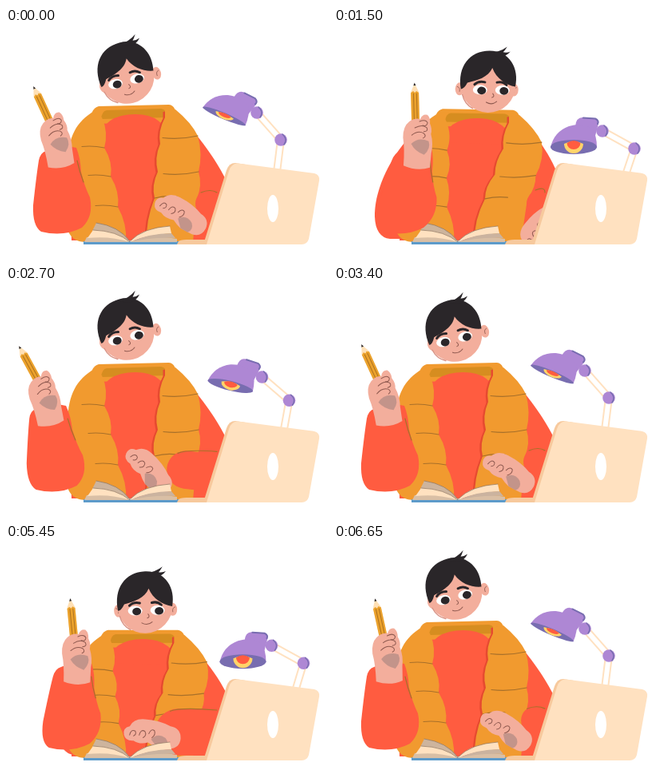
Recreate the animation shown at these times as an HTML page. Size 403 by 288 pixels, loop 6.7 s.

```html
<!DOCTYPE html>
<html lang="en">
<head>
<meta charset="utf-8">
<title>Studying at the desk</title>
<style>
html, body { margin: 0; width: 100%; height: 100%; overflow: hidden; background: #fff; }
svg { display: block; width: 100vw; height: 100vh; }
</style>
</head>
<body>
<svg id="stage" viewBox="0 0 403 288">
  <clipPath id="desk"><rect width="403" height="268"/></clipPath>
</svg>
<script>
const LOOP = 6700, SECOND = 3450, STEP = 50, WAG = 425;
const RED = '#ff5c40', ORANGE = '#f19a2f', DARK = '#d68d20', CREASE = '#a8702a', SKIN = '#f3ae9c',
  SHADE = '#c3948a', LINE = '#8f5a50', HAIR = '#2a2629', CREAM = '#ffe1c0', LILAC = '#ae87d4', VIOLET = '#786db0';
const stage = document.getElementById('stage');

function set(node, attrs) {
  for (const key in attrs) node.setAttribute(key, attrs[key]);
}
function add(parent, tag, attrs) {
  const node = document.createElementNS('http://www.w3.org/2000/svg', tag);
  set(node, attrs || {});
  return parent.appendChild(node);
}
const group = parent => add(parent, 'g');
const fill = (parent, d, color) => add(parent, 'path', { d, fill: color });
const line = (parent, d, color, width) => add(parent, 'path', {
  d, fill: 'none', stroke: color, 'stroke-width': width, 'stroke-linecap': 'round', 'stroke-linejoin': 'round' });
const oval = (parent, cx, cy, rx, ry, color) => add(parent, 'ellipse', { cx, cy, rx, ry, fill: color });
const place = (node, x, y, turn = 0, tall = 1) =>
  node.setAttribute('transform', `translate(${x} ${y}) rotate(${turn}) scale(1 ${tall})`);

// Timing curves
const clamp = s => Math.min(1, Math.max(0, s));
const smooth = s => clamp(s) ** 2 * (3 - 2 * clamp(s));
const ease = (u, from, to) => smooth((u - from) / (to - from));
const pulse = (u, rise, top, fall, end) => ease(u, rise, top) - ease(u, fall, end);
const bump = (u, from, to) => Math.sin(Math.PI * clamp((u - from) / (to - from)));

// Moves every x y pair of a path.
const remap = (d, move) => d.replace(/(-?[\d.]+) (-?[\d.]+)/g, (_, x, y) =>
  move(+x, +y).map(v => v.toFixed(1)).join(' '));
const soft = [];
function flexible(node, move) {
  const d = node.getAttribute('d');
  soft.push(p => node.setAttribute('d', remap(d, (x, y) => move(x, y, p))));
  return node;
}
// The torso bends above the waist, the collar most of all.
const bend = (x, y, { lean, nod }) => {
  const k = smooth((240 - y) / 110);
  return [x + 20 * lean * k, y + k * (lean * (3 + (x - 110) * .04) + 8 * nod)];
};
// The sleeve follows the wrist, the elbow less so.
const follow = (x, y, { penX }) => [x + penX * (1 - .5 * clamp((y - 150) / 100)), y];

// Scalloped quilt edge through the given points.
const puffs = (points, bulge) => points.slice(1).map(([x, y], i) =>
  `Q${(x + points[i][0]) / 2 + bulge} ${(y + points[i][1]) / 2} ${x} ${y}`).join(' ');
// Seams start at an edge point and run sideways.
const seams = (points, length, sag) => points.map(([x, y]) =>
  `M${x} ${y} Q${x + length / 2} ${y + sag} ${x + length} ${y + sag / 2}`).join(' ');

// Lamp
const lamp = group(stage);
const rods = [CREAM, '#fff'].map((color, i) => line(lamp, '', color, i ? 6 : 10));
const shade = group(lamp);
fill(shade, 'M-34 -6 Q-33 -17 -25 -17 L-9 -16 Q-3 -13 -5 -9 L-9 6Z', LILAC);
line(shade, 'M-24 -16.5 L-9 -15.5 Q-4 -13 -6 -9', VIOLET, 2);
fill(shade, 'M-65 21 Q-61 1 -42 -6 Q-24 -11 -13 -3 Q-7 5 -7 21Z', LILAC);
const mouth = oval(shade, -36, 20, 29, 9, VIOLET);
const glow = fill(shade, 'M-48 16 A12 12 0 0 0 -24 16 Q-36 10 -48 16Z', '#ffd469');
const bulb = fill(shade, 'M-44.500 15 A8.5 8 0 0 0 -27.500 15 Q-36 9 -44.500 15Z', RED);
const knobs = [0, 1].map(() => {
  const g = group(lamp);
  oval(g, 0, 0, 7.8, 7.8, LILAC);
  line(g, 'M2 -7 Q9 -1 4 6', VIOLET, 1.5);
  return g;
});

// Torso and vest
const body = group(stage);
const backArm = fill(body, 'M132 108 C90 126 50 190 51 236 Q52 262 70 264 L130 264Z', RED);
const cloth = (d, color) => flexible(fill(body, d, color), bend);
const stitch = d => flexible(line(body, d, CREASE, 1.2), bend);
const leftEdge = [[150, 268], [140, 224], [131, 186], [123, 150], [120, 112]];
const rightEdge = [[176, 268], [186, 213], [190, 180], [193, 145], [199, 112]];
const outerEdge = [[212, 102], [240, 135], [241, 180], [239, 213]];
cloth('M110 108 C90 118 80 145 80 200 L82 266 L270 266 L280 200 C262 160 232 124 212 106Z', RED);
cloth('M106 120 Q105 101 116 98 L204 96 Q214 97 214 118Z', ORANGE);
cloth('M119 114 Q120 104 126 103 L194 101 Q201 102 202 112Z', DARK);
cloth('M116 140 Q122 108 162 108 Q198 108 204 140Z', RED);
cloth(`M110 104 C88 118 78 135 77 170 L78 255 Q84 268 100 268 L150 268 ${puffs(leftEdge, 7)}Z`, ORANGE);
stitch(seams(leftEdge.slice(1, 4), -28, -3));
const panel = `M199 104 L212 102 ${puffs(outerEdge, 6)} L234 268 L176 268 ${puffs(rightEdge, -6)}Z`;
cloth(panel, '#e64a30').setAttribute('transform', 'translate(-2.5 1)');
cloth(panel, ORANGE);
stitch(seams(outerEdge.slice(1, 3), -44, 5) + seams(rightEdge.slice(1, 2), 28, -4));

// Right sleeve and hand
const sleeve = line(stage, '', RED, 34);
const sleeveFold = line(stage, '', CREASE, 1.2);
const palm = group(add(stage, 'g', { 'clip-path': 'url(#desk)' }));
fill(palm, 'M-34 2 Q-36 -7 -27 -9 Q-22 -19 -8 -18 Q10 -17 24 -10 Q37 -8 37 5 Q36 17 24 18 L8 17 Q2 15 -4 11 Q-14 14 -22 9 Q-32 10 -34 2Z', SKIN);
fill(palm, 'M0 7 Q8 -2 18 5 Q24 12 18 18 L8 17Z', SHADE);
line(palm, 'M-27 2 q2 -8 7 -5 q2 4 -2 6 M-15 2 q2 -8 7 -5 q3 5 -2 8 M-3 0 q3 -7 7 -4 q2 5 -3 9', LINE, 1);

// Laptop
fill(stage, 'M214 268 Q218 265 226 265 L262 265 L262 271 L214 271Z', '#f7c99d');
fill(stage, 'M247 271 L276 178 Q279 169 287 169 L300 171 L270 271Z', '#f7c99d');
fill(stage, 'M251 271 L279 179 Q282 169 291 169.5 L386 182 Q393 184 392 191 L379 264 Q377 271 370 271Z', CREAM);
oval(stage, 334, 226, 7, 17, '#fff');

// Book
fill(stage, 'M97 267 L216 267 L214 271 L97 271Z', '#5d9bca');
fill(stage, 'M101 262 Q130 258 155 268 Q182 258 214 264 L214 268 L98 268Z', '#d9bfa5');
fill(stage, 'M113 244 Q141 248 155 267 Q132 254 108 254Z', '#cdb49d');
fill(stage, 'M102 263 L109 253 Q139 254 155 268 Q130 260 102 263Z', CREAM);
fill(stage, 'M155 268 Q168 251 205 248 L207 257 Q176 259 155 268Z', CREAM);
fill(stage, 'M155 268 Q180 257 207 257 L212 263 Q180 262 155 268Z', '#cbb39f');
line(stage, 'M113 244 Q141 248 155 267 Q172 250 205 248 M109 253 Q139 254 155 268', '#8c7561', .7);

// Left arm, hand and pencil
flexible(fill(stage, 'M50 154 Q70 145 88 150 Q93 162 94 180 Q98 198 105 212 Q110 236 95 250 Q72 262 44 255 Q33 248 34 222 Q38 185 41 166 Q43 156 50 154Z', RED), follow);
flexible(line(stage, 'M89 166 Q92 180 97 193', CREASE, 1.2), follow);
const fist = group(stage);
const pencil = group(fist);
fill(pencil, 'M-5 8 L-5 -35 L0 -46 L5 -35 L5 8Z', '#ffe0b5');
fill(pencil, 'M-5 8 L-5 -34 L-2 -36 L0 -34 L2 -36 L5 -34 L5 8Z', '#eba22d');
line(pencil, 'M-1.7 -33 L-1.7 6 M2.2 -33 L2.2 6', '#ad701d', 1);
fill(pencil, 'M-1.5 -43 L0 -46.5 L1.5 -43Z', HAIR);
fill(fist, 'M-17 -3 Q-15 -24 -17 -38 Q-17 -52 -9 -58 Q-2 -63 5 -61 Q8 -68 14 -66 Q18 -62 17 -55 Q20 -48 18 -42 Q21 -30 18 -18 L16 0 Q0 5 -17 -3Z', SKIN);
fill(fist, 'M-7 -30 Q2 -39 15 -33 Q18 -24 9 -16 Q-2 -20 -7 -30Z', SHADE);
line(fist, 'M4 -58 q8 -3 10 2 q-1 5 -6 3 M-2 -50 q9 -5 15 0 q2 5 -4 5 M-6 -41 q8 -6 15 -2 q4 4 -1 6', LINE, 1);

// Head
const head = group(stage);
const ears = group(head);
[-1, 1].forEach(side => {
  oval(ears, side * 34, 10, 5.5, 8, SKIN);
  line(ears, `M${side * 37} 7 q${-side * 4} 1 ${-side * 3} 6`, LINE, .8);
});
oval(head, 0, 4, 34.5, 35, SKIN);
line(head, 'M-32 17 Q-29 29 -19 34', '#d99385', 1.5);
fill(head, 'M-34 10 C-39 -18 -24 -38 1 -38.5 C26 -39 39 -17 34 6 C22 4 10 -4 5 -17 C0 -5 -14 -1 -26 2 Q-30 10 -34 10Z', HAIR);
fill(head, 'M0 -36 Q14 -37 23 -44 Q20 -39 18 -37 Q23 -36 27 -38 Q22 -31 12 -31Z', HAIR);
const face = group(head);
line(face, 'M-19 4 Q-14 -1 -6 1 M9 1 Q16 -1 21 4', HAIR, 3);
const eyes = group(face);
[-12, 16].forEach(x => oval(eyes, x, 0, 9, 6, '#fff'));
const pupils = group(eyes);
[-12, 16].forEach(x => oval(pupils, x, 0, 5.5, 4.8, HAIR));
line(face, 'M4 15 Q7 19 3 20', LINE, 1);
line(face, 'M-4 26 Q3 30 9 25', LINE, 1.1);

function drawLamp(lift, drift) {
  const x1 = 314 + 16 * lift + drift, y1 = 106 + 20 * lift + drift / 2;
  const x2 = 344 + 26 * lift + drift, y2 = 140 + 8 * lift + drift / 2;
  const foot = 338 + (x2 - 344) * .8;
  rods.forEach(rod => rod.setAttribute('d', `M${x1} ${y1} L${x2} ${y2} L${foot} 188`));
  place(shade, x1, y1, 23 * (1 - lift));
  place(knobs[0], x1, y1);
  place(knobs[1], x2, y2);
  const open = .45 + .55 * lift;
  mouth.setAttribute('ry', 9 * open);
  [glow, bulb].forEach(node => place(node, 0, 20 * (1 - open), 0, open));
}

function drawHead({ lean, nod, hop, drift, blink }) {
  place(head, 150 + 40 * lean + drift / 2, 56 + 8 * lean + 11 * nod + drift / 2 - hop, -14 + 15 * lean + 4 * nod);
  const turn = -4 + 6 * lean;
  place(ears, -turn * .8, 0);
  place(face, turn, 0);
  place(eyes, 0, 10.5, 0, 1 - .45 * blink);
  place(pupils, 2, 1);
}

function drawArms({ lean, read, penX, tilt }) {
  place(fist, 70 + penX, 173 + 2 * lean, tilt * .6);
  place(pencil, -1, -60, tilt * .4);

  const x = 218 + 40 * lean - 59 * read, y = 232 + 17 * lean - 4 * read;
  place(palm, x, y, 24 - 79 * lean + 22 * read);
  const width = 34 + 8 * lean + 20 * read;
  const ex = x + 36 - 32 * lean + 16 * read, ey = y - 12 - 16 * lean + 19 * read;
  const top = ey - width / 2;
  set(sleeve, { d: `M${ex} ${ey} L292 ${238 - 4 * lean}`, 'stroke-width': width });
  sleeveFold.setAttribute('d', `M${ex - 10} ${top + 3} Q${ex + 2} ${top - 2} 264 ${206 + 2 * read}`);
}

function draw(u) {
  const lean = pulse(u, 250, 750, 1750, 2300);
  const pose = {
    lean,
    read: pulse(u, 1500, 2000, 2300, 3350),
    nod: pulse(u, 1500, 2000, 2100, 2700),
    hop: 4 * bump(u, 2600, 3200),
    drift: 6 * bump(u, 700, 2200),
    blink: bump(u, 950, 1250),
    penX: 34 * lean - 20 * bump(u, 2000, 2900),
    tilt: -19 + 8 * Math.sin((u / WAG + .625) * 2 * Math.PI) + 11 * bump(u, 400, 2400) - 12 * bump(u, 2100, 2900)
  };
  soft.forEach(update => update(pose));
  place(backArm, 35 * (1 - lean), 0);
  drawLamp(pulse(u, 250, 700, 2050, 3200), pose.drift);
  drawHead(pose);
  drawArms(pose);
}

const start = performance.now();
function frame(now) {
  const t = Math.floor(Math.max(0, now - start) % LOOP / STEP) * STEP;
  draw(t % SECOND);
  requestAnimationFrame(frame);
}
frame(start);
</script>
</body>
</html>
```
